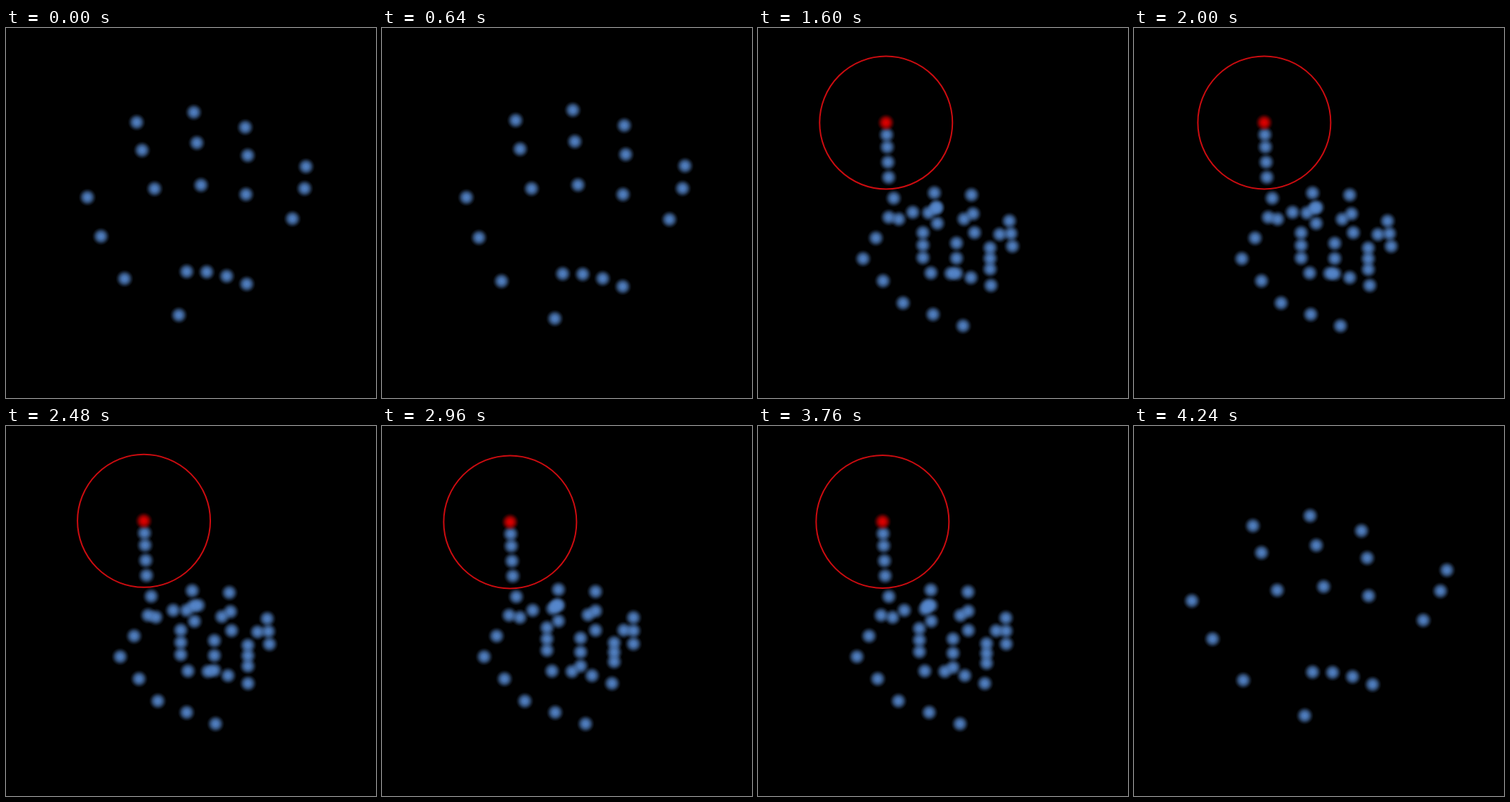
Recreate the animation shown at these times as an HTML page with a canvas. Size 518 by 518 pixels, loop 4320 ms.

```html
<!DOCTYPE html>
<html lang="en">
<head>
<meta charset="utf-8">
<title>Hand tracking</title>
<style>
  html, body { margin: 0; height: 100%; overflow: hidden; background: #000; }
  canvas { display: block; width: 100vw; height: 100vh; }
</style>
</head>
<body>
<canvas id="stage" width="518" height="518"></canvas>
<script>
const LOOP = 4320, STEP = 80;
const POINT_START = 1040, POINT_END = 3920;
const THUMB = 0, INDEX = 1, PINKY = 4, TIP = 4;
const BLUE = '86,136,206', RED = '235,0,0';
const ctx = document.getElementById('stage').getContext('2d');

const mix = (a, b, u) => [a[0] + (b[0] - a[0]) * u, a[1] + (b[1] - a[1]) * u];

// A pose is five fingers, thumb first, of five joints from wrist to tip.
const adjust = (pose, move) =>
  pose.map((finger, f) => finger.map(([x, y], k) => move(x, y, k, f)));

// Finger roots fan out along the wrist, starting below the index finger.
const root = ([x, y], f) => {
  const n = f - INDEX;
  return [x + 28 * n, y + 2.6 * n * n - 2 * n];
};

// Stretched finger: slightly bowed, the tip continues the last bone.
function straight(knuckle, end, f) {
  const middle = mix(knuckle, end, f === THUMB ? 0.52 : 0.58);
  middle[0] += 3 * (f - 2);
  return [knuckle, middle, end, mix(middle, end, 1.8)];
}

// Folded finger: up from the knuckle, then back down to the tip.
function folded(knuckle, tip) {
  const r = Math.hypot(tip[0] - knuckle[0], tip[1] - knuckle[1]);
  return [knuckle, [knuckle[0], knuckle[1] - r], [tip[0], tip[1] - 0.72 * r], tip];
}

const openWrist = [253, 341];
const open = [
  [[166, 351], [114, 237]],
  [[208, 225], [183, 132]],
  [[273, 220], [263, 118]],
  [[336, 233], [335, 139]],
  [[401, 267], [420, 194]]
].map(([knuckle, end], f) =>
  [f === THUMB ? [242, 402] : root(openWrist, f), ...straight(knuckle, end, f)]);

const lean = adjust(open, (x, y, k) => [x + 1.4 * k, y + (y - 230) * 0.028]);

const spread = adjust(open, (x, y, k, f) => {
  const reach = f === THUMB ? -10 : f === PINKY ? 7 : -4.5;
  return [x - 3 + k * reach, y + 3.5 + 1.4 * k];
});

const pointWrist = [238, 343];
const point = [
  [[285, 417], [200, 385], [143, 323], [178, 265], [244, 251]],
  [root(pointWrist, INDEX), ...straight([193, 268], [181, 168], INDEX)],
  ...[
    [[247, 273], [231, 314]],
    [[299, 286], [278, 336]],
    [[352, 305], [325, 330]]
  ].map(([knuckle, tip], i) => [root(pointWrist, i + 2), ...folded(knuckle, tip)])
];

// Pointing with a looser grip and the index finger a little lower.
const loose = adjust(point, (x, y, k, f) => {
  if (f === THUMB) return [x - 3 + 6 * k - 2.5 * k * k, y + 8 - k * k];
  const widen = 0.08 * (x - 150) * (k ? 1 : 0.3);
  return [x + widen, y + (f === INDEX ? 3.5 * k : 3 - 2 * k)];
});

// Sideways shift of palm and fingertips; curl lowers the folded fingers.
const sway = (pose, palm, tips, curl) => adjust(pose, (x, y, k, f) => {
  if (f === THUMB) return [x + palm * (0.5 + 0.25 * k), y];
  const drop = f === INDEX ? -k / 16 : k * k / 16;
  return [x + (k < 2 ? palm : tips), y + curl * drop];
});

const keys = [
  [0, open],
  [640, lean],
  [720, lean],
  [1040, sway(loose, 8, 1, 4)],
  [1200, loose],
  [1440, sway(point, -7, -9, 6)],
  [1680, sway(point, 8, 3, 8)],
  [2000, sway(point, 8, 3, 8)],
  [2240, sway(point, 6, 1, 8)],
  [2740, sway(point, 29, 28, 4)],
  [2960, point],
  [3100, sway(point, -7, -8, 2)],
  [3400, sway(point, 9, 12, 4)],
  [3680, sway(point, -6, -7, 2)],
  [3840, sway(point, -3, -3, 2)],
  [4160, spread]
];

function poseAt(t) {
  const next = keys.findIndex(([time]) => time > t);
  if (next < 0) return spread;
  const [t0, from] = keys[next - 1], [t1, to] = keys[next];
  const u = (t - t0) / (t1 - t0);
  const eased = u * u * (3 - 2 * u);
  return from.map((finger, f) => finger.map((p, k) => mix(p, to[f][k], eased)));
}

function dot([x, y], rgb) {
  const r = 12.5;
  const glow = ctx.createRadialGradient(x, y, 0, x, y, r);
  [[0, 0.95], [0.3, 0.83], [0.55, 0.57], [0.8, 0.2], [1, 0]]
    .forEach(([stop, alpha]) => glow.addColorStop(stop, `rgba(${rgb},${alpha})`));
  ctx.fillStyle = glow;
  ctx.fillRect(x - r, y - r, 2 * r, 2 * r);
}

function draw(t) {
  const pose = poseAt(t);
  ctx.fillStyle = '#000';
  ctx.fillRect(0, 0, 518, 518);

  pose.forEach(finger => finger.slice(0, TIP).forEach(p => dot(p, BLUE)));
  if (t < POINT_START || t >= POINT_END) return;

  // While pointing, tips and bone centres show as well.
  pose.forEach((finger, f) => {
    for (let k = f === THUMB ? 0 : 1; k < TIP; k++) {
      dot(mix(finger[k], finger[k + 1], 0.5), BLUE);
    }
    if (f !== INDEX) dot(finger[TIP], BLUE);
  });

  const [x, y] = pose[INDEX][TIP];
  dot([x, y], RED);
  ctx.strokeStyle = '#cc0c10';
  ctx.lineWidth = 2;
  ctx.beginPath();
  ctx.arc(x, y, 93, 0, Math.PI * 2);
  ctx.stroke();
}

function tick() {
  draw(Math.floor((performance.now() % LOOP) / STEP) * STEP);
  requestAnimationFrame(tick);
}
tick();
</script>
</body>
</html>
```
